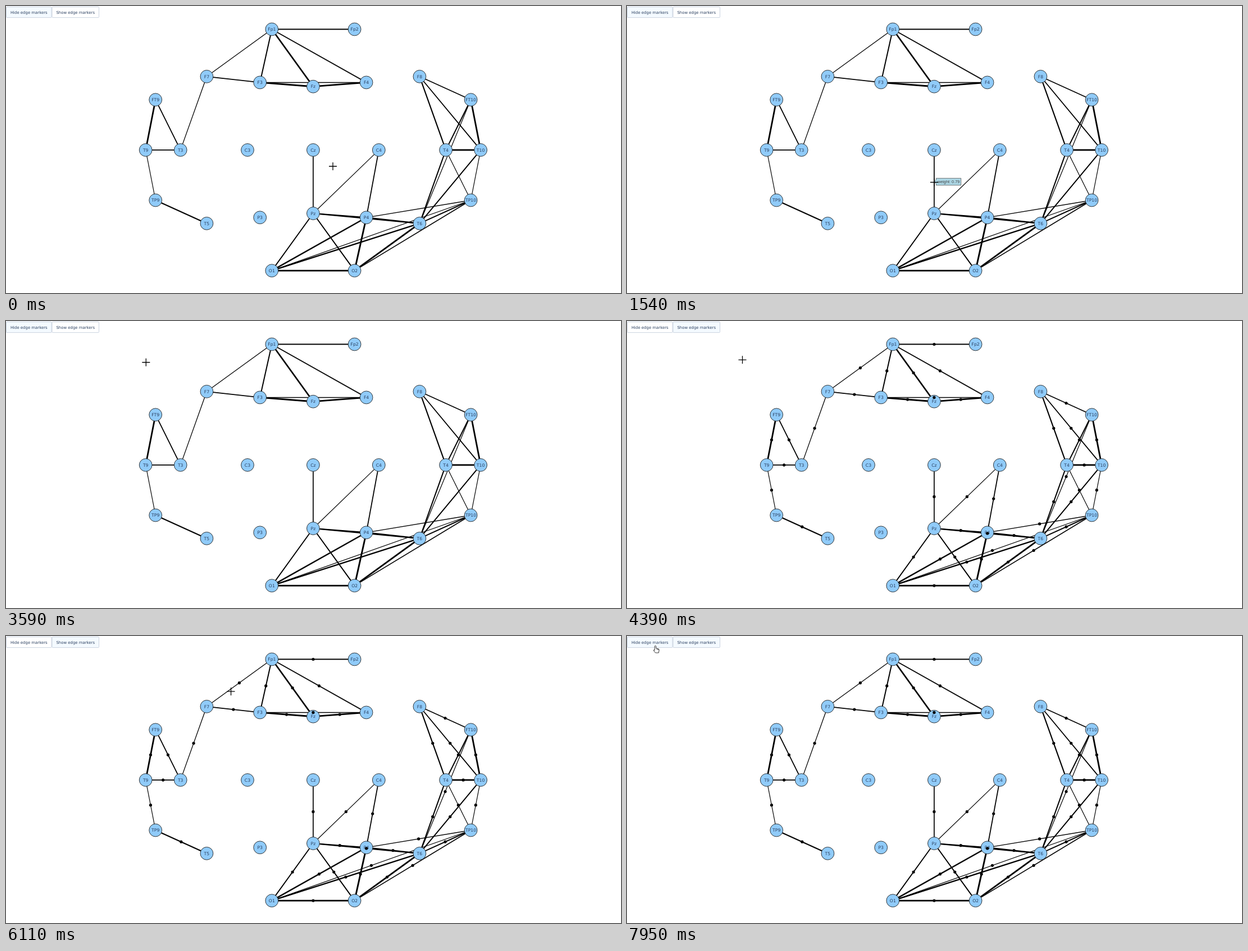
An HTML page with a canvas that plays this animation: 1095 px wide and 512 px high, repeating every 8000 ms.

```html
<!DOCTYPE html>
<html lang="en">
<head>
<meta charset="utf-8">
<title>Weighted electrode graph</title>
<style>
html, body { margin: 0; width: 100%; height: 100%; overflow: hidden; background: #fff; }
canvas { display: block; }
</style>
</head>
<body>
<canvas width="1095" height="512"></canvas>
<script>
const LOOP = 8000, CLICK = 4290;
const ctx = document.querySelector('canvas').getContext('2d');

const nodes = {
  Fp1: [473.3, 41.5], Fp2: [620.6, 41.5], F7: [357.4, 125.8], F3: [452.2, 136.4],
  Fz: [546.9, 143.7], F4: [641.6, 136.4], F8: [736.4, 125.8], FT9: [266.2, 167.2],
  FT10: [827.6, 167.2], T9: [248.7, 256.9], T3: [310.7, 256.9], C3: [430, 256.9],
  Cz: [546.9, 256.9], C4: [663.8, 256.9], T4: [783.1, 256.9], T10: [845.1, 256.9],
  TP9: [266.2, 346.5], TP10: [827.6, 346.5], T5: [357.4, 387.9], P3: [452.2, 377.3],
  Pz: [546.9, 370], P4: [641.6, 377.3], T6: [736.4, 387.9], O1: [473.3, 472.1], O2: [620.6, 472.1]
};

// from-to:line width
const edges = `Fp1-Fp2:2.2 Fp1-F7:1.3 Fp1-F3:2 Fp1-Fz:2.7 Fp1-F4:1.8 F7-F3:1.7 F7-T3:1.3
  F3-F4:1.5 F3-Fz:2.9 Fz-F4:2.8 FT9-T9:2.8 FT9-T3:1.8 T9-T3:1.9 T9-TP9:1.2 TP9-T5:2.2
  Cz-Pz:1.7 C4-Pz:1.2 C4-P4:1.8 Pz-P4:2 Pz-T6:2 P4-T6:2.3 Pz-O1:1.9 Pz-O2:2 P4-O1:2.4
  P4-O2:2.9 O1-O2:2.9 O1-T6:2.3 O1-TP10:1.3 O2-T6:2.9 O2-TP10:1.6 T6-TP10:2 P4-TP10:1.3
  T4-T6:2 T6-T10:2 FT10-T6:1.2 T4-TP10:1.2 T10-TP10:1.2 T4-T10:2.7 FT10-T4:2 FT10-T10:2.8
  F8-FT10:1.8 F8-T4:2.1 F8-T10:1.8`.split(/\s+/).map(entry => {
  const [ends, width] = entry.split(':');
  const [a, b] = ends.split('-').map(name => nodes[name]);
  return { a, b, width: +width, mid: [(a[0] + b[0]) / 2, (a[1] + b[1]) / 2] };
});

// time, x, y of the pointer
const path = [
  [0, 582, 286], [190, 582, 286], [750, 546, 299], [950, 546, 299], [1540, 547, 314.5],
  [2280, 547, 314.5], [2940, 407, 132], [3440, 407, 132], [3590, 250, 74], [3800, 142, 31],
  [4230, 112, 17], [CLICK, 112, 17], [4390, 205, 69], [4650, 292, 130], [5090, 332, 189],
  [5190, 332, 189], [5220, 333, 190], [5780, 333, 190], [6110, 400.5, 99], [6570, 415, 83.5],
  [6980, 415, 83.5], [7130, 249, 78], [7400, 115, 42], [7770, 47, 11], [7870, 47, 11],
  [7950, 50.5, 17], [LOOP, 50.5, 17]
];

// start, end, anchor, text
const tips = [
  [1540, 2320, [546.9, 313.5], 'weight: 0.79'],
  [2940, 3480, [404.8, 131.1], 'weight: 0.80'],
  [5370, 5820, [334, 191.3], 'weight: 0.74'],
  [6620, 7020, [415.3, 83.6], 'weight: 0.73']
];

const buttons = [
  { label: 'Hide edge markers', x: 0.5, w: 80.5 },
  { label: 'Show edge markers', x: 82, w: 83.5 }
];

const slope = (i, k) => {
  const p = path[i], q = path[i + 1];
  return p && q ? (q[k] - p[k]) / (q[0] - p[0]) : 0;
};
const tangent = (i, k) => {
  const a = slope(i - 1, k), b = slope(i, k);
  return a * b > 0 ? 2 * a * b / (a + b) : 0;
};

// Monotone cubic interpolation along the pointer path
function pointerAt(t) {
  const i = path.findIndex((p, n) => n + 1 < path.length && t < path[n + 1][0]);
  const p = path[i], q = path[i + 1], h = q[0] - p[0], u = (t - p[0]) / h, v = 1 - u;
  return [1, 2].map(k =>
    p[k] * v * v * (1 + 2 * u) + q[k] * u * u * (3 - 2 * u) +
    h * u * v * (tangent(i, k) * v - tangent(i + 1, k) * u));
}

function disc([x, y], r) {
  ctx.beginPath();
  ctx.arc(x, y, r, 0, Math.PI * 2);
  ctx.fill();
}

function text(str, x, y, font, color) {
  ctx.font = font;
  ctx.fillStyle = color;
  ctx.fillText(str, x, y);
}

function drawGraph(showMarkers) {
  ctx.strokeStyle = '#000';
  for (const { a, b, width } of edges) {
    ctx.lineWidth = width;
    ctx.beginPath();
    ctx.moveTo(...a);
    ctx.lineTo(...b);
    ctx.stroke();
  }
  ctx.lineWidth = 0.9;
  ctx.strokeStyle = '#222';
  for (const [name, [x, y]] of Object.entries(nodes)) {
    ctx.fillStyle = '#90cbf9';
    disc([x, y], 11.4);
    ctx.stroke();
    text(name, x, y + 2.7, '7.7px "DejaVu Sans", sans-serif', '#2a3f5f');
  }
  if (!showMarkers) return;
  ctx.fillStyle = '#000';
  edges.forEach(edge => disc(edge.mid, 2.6));
}

function drawButton({ label, x, w }, lit) {
  ctx.fillStyle = lit ? '#f4faff' : '#fff';
  ctx.strokeStyle = '#bec8d9';
  ctx.lineWidth = 0.8;
  ctx.beginPath();
  ctx.roundRect(x, 1.6, w, 19, 1.2);
  ctx.fill();
  ctx.stroke();
  text(label, x + w / 2, 14, '6.92px "DejaVu Sans", sans-serif', '#2a3f5f');
}

function drawTip([x, y], label) {
  ctx.fillStyle = '#add8e6';
  ctx.strokeStyle = '#444';
  ctx.lineWidth = 0.7;
  ctx.stroke(fillShape(`M${x} ${y}l3.4-3.4v-2.8h44.4v12.4h-44.4v-2.8z`));
  text(label, x + 25.7, y + 2.6, '7.3px "Liberation Sans", Arial, sans-serif', '#444');
}

function fillShape(d) {
  const shape = new Path2D(d);
  ctx.fill(shape);
  return shape;
}

function drawPointer(x, y, isHand) {
  ctx.save();
  ctx.translate(x, y);
  ctx.strokeStyle = isHand ? '#222' : '#000';
  ctx.fillStyle = '#fff';
  ctx.lineWidth = isHand ? 0.9 : 1.3;
  ctx.stroke(isHand
    ? fillShape('M-1.2 1Q0-.8 1.2 1V5L5 5.8Q7 6 6.7 8L5.8 13H.2L-3.3 8.8Q-3.4 7-1.2 8.5Z M3 5.6V7.5M5 6V8')
    : new Path2D('M-7 0H7M0-7V7'));
  ctx.restore();
}

function frame() {
  const t = performance.now() % LOOP;
  const [x, y] = pointerAt(t);
  const clicked = t >= CLICK;
  const over = y < 20.5 ? buttons.findIndex(b => x > b.x && x < b.x + b.w) : -1;

  ctx.fillStyle = '#fff';
  ctx.fillRect(0, 0, 1095, 512);
  ctx.textAlign = 'center';
  drawGraph(clicked);
  buttons.forEach((b, i) => drawButton(b, i === over || i === +clicked));
  for (const [start, end, anchor, label] of tips) {
    if (t >= start && t < end) drawTip(anchor, label);
  }
  drawPointer(x, y, over >= 0);
  requestAnimationFrame(frame);
}
requestAnimationFrame(frame);
</script>
</body>
</html>
```
